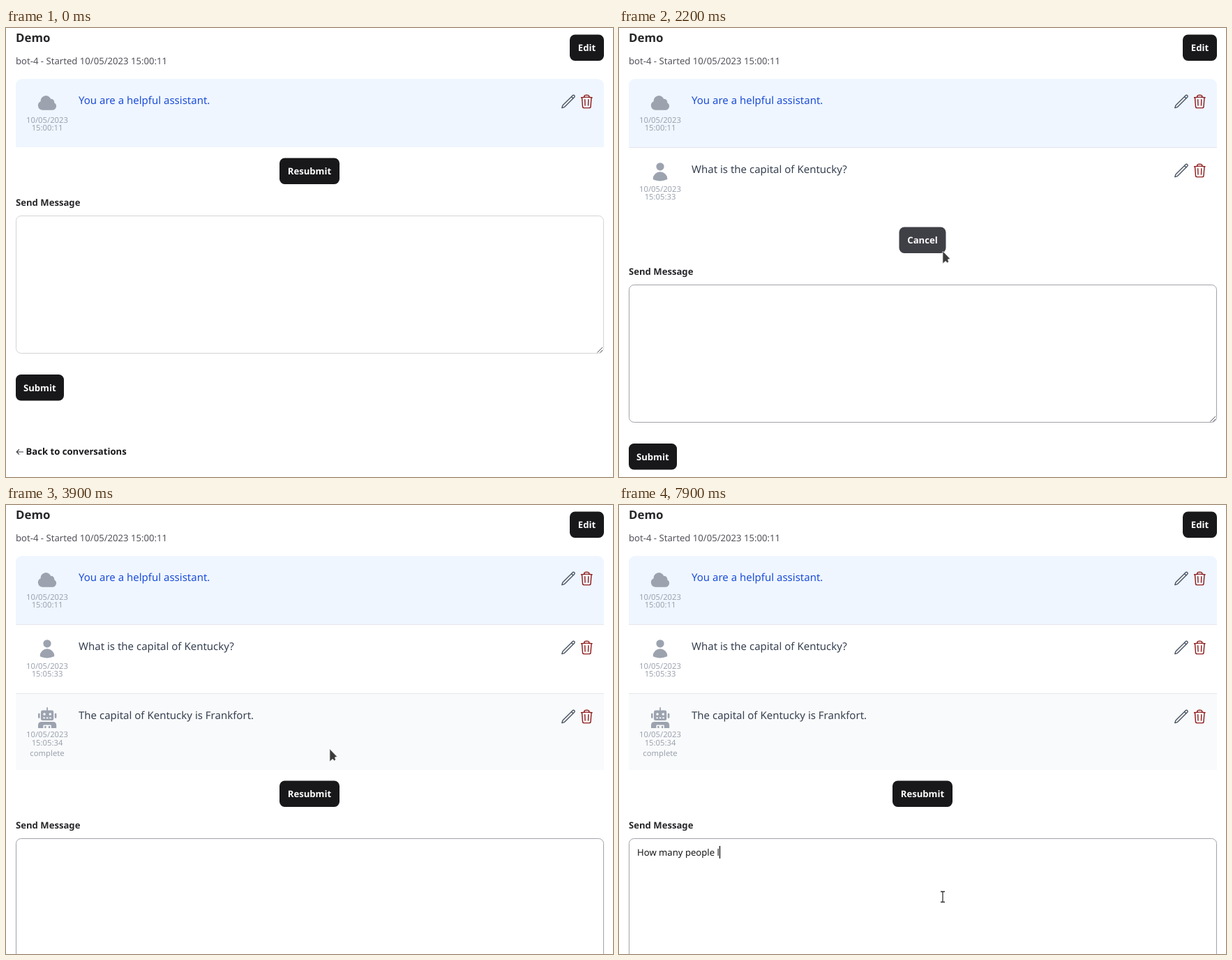
These frames come from a looping animation (870 px wide and 644 px high, 8 s). An HTML page:

```html
<!DOCTYPE html>
<html lang="en">
<head>
<meta charset="utf-8">
<title>Chat demo</title>
<style>
  html, body { margin: 0; width: 100%; height: 100%; overflow: hidden; background: #fff; }
  svg { display: block; width: 870px; height: 644px; }
  text {
    font: 13.125px "Noto Sans", "Open Sans", sans-serif;
    text-rendering: geometricPrecision;
    white-space: pre;
    fill: #18181b;
  }
  .bold { font-weight: 700; }
  .title { font-size: 16.875px; fill: #27272a; }
  .label { fill: #27272a; }
  .meta { fill: #52525b; }
  .msg { font-size: 15px; fill: #374151; }
  .system { fill: #1d4ed8; }
  .date { font-size: 11.25px; fill: #9ca3af; text-anchor: middle; }
  .btn rect { fill: #18181b; }
  .btn.hover rect { fill: #3f3f46; }
  .btn text { fill: #fff; text-anchor: middle; font-weight: 700; }
  .icon { fill: #9ca3af; }
  .line { fill: none; stroke-width: 1.5; stroke-linecap: round; stroke-linejoin: round; }
  .rule { fill: #e5e7eb; }
</style>
</head>
<body>
<svg viewBox="0 0 870 644">
  <defs>
    <g id="tools">
      <path class="line" stroke="#4b5563" transform="translate(794.7 94.2) scale(.9375)"
        d="M16.862 4.487l1.687-1.688a1.875 1.875 0 1 1 2.652 2.652L6.832 19.82a4.5 4.5 0 0 1-1.897 1.13l-2.685.8.8-2.685a4.5 4.5 0 0 1 1.13-1.897L16.863 4.487zm0 0L19.5 7.125"/>
      <path class="line" stroke="#8f1d1d" transform="translate(821 94.2) scale(.9375)"
        d="M14.74 9l-.346 9m-4.788 0L9.26 9m9.968-3.21c.342.052.682.107 1.022.166m-1.022-.165L18.16 19.673a2.25 2.25 0 0 1-2.244 2.077H8.084a2.25 2.25 0 0 1-2.244-2.077L4.772 5.79m14.456 0a48.1 48.1 0 0 0-3.478-.397m-12 .562c.34-.059.68-.114 1.022-.165m0 0a48.1 48.1 0 0 1 3.478-.397m7.5 0v-.916c0-1.18-.91-2.164-2.09-2.201a52 52 0 0 0-3.32 0c-1.18.037-2.09 1.022-2.09 2.201v.916m7.5 0a48.7 48.7 0 0 0-7.5 0"/>
    </g>
  </defs>

  <text class="bold title" x="14" y="19.5">Demo</text>
  <text class="meta" x="14" y="51.5">bot-4 - Started 10/05/2023 15:00:11</text>
  <g class="btn"><rect x="808" y="9.5" width="49" height="37.5" rx="7.5"/><text x="832.5" y="33">Edit</text></g>

  <path fill="#eff6ff" d="M14 171V82a9 9 0 0 1 9-9H848a9 9 0 0 1 9 9V171z"/>
  <path class="icon" transform="translate(44 92.4) scale(1.25)"
    d="M4.5 9.75a6 6 0 0 1 11.573-2.226 3.75 3.75 0 0 1 4.133 4.34A4.5 4.5 0 0 1 18 20.25H6.75a5.25 5.25 0 0 1-2.23-10.004 6.07 6.07 0 0 1-.02-.496z"/>
  <text class="date" x="59" y="135.5">10/05/2023</text>
  <text class="date" x="59" y="146.8">15:00:11</text>
  <text class="msg system" x="104" y="109">You are a helpful assistant.</text>
  <use href="#tools"/>

  <g id="ask">
    <rect class="rule" x="14" y="171" width="843" height="1"/>
    <g class="icon" transform="translate(44 191.3) scale(1.25)">
      <circle cx="12" cy="6" r="4.5"/>
      <path d="M3.751 20.105a8.25 8.25 0 0 1 16.498 0 .75.75 0 0 1-.437.695A18.7 18.7 0 0 1 12 22.5c-2.786 0-5.433-.608-7.812-1.7a.75.75 0 0 1-.437-.695z"/>
    </g>
    <text class="date" x="59" y="234.5">10/05/2023</text>
    <text class="date" x="59" y="245.8">15:05:33</text>
    <text class="msg" x="104" y="208">What is the capital of Kentucky?</text>
    <use href="#tools" y="99"/>
  </g>

  <g id="answer">
    <rect id="panel" x="14" y="271" width="843" height="76" fill="#f9fafb"/>
    <rect class="rule" x="14" y="270" width="843" height="1"/>
    <g class="icon">
      <path d="M58.2 290.3h1.8v5h-1.8z"/>
      <rect x="50" y="294.5" width="18.2" height="14.6" rx="2.4"/>
      <rect x="46" y="298.8" width="2.6" height="7" rx="1"/>
      <rect x="69.8" y="298.8" width="2.6" height="7" rx="1"/>
      <path d="M46 320v-4.2q0-4.8 4.8-4.8h16.6q4.8 0 4.8 4.8v4.2z"/>
      <g fill="#f9fafb">
        <circle cx="55" cy="300" r="1.8"/><circle cx="63.3" cy="300" r="1.8"/>
        <path d="M53.3 304.6h2.6v1.6h-2.6zM57.8 304.6h2.6v1.6h-2.6zM62.3 304.6h2.6v1.6h-2.6z"/>
        <path d="M53.4 320v-3.6q0-1 1-1h9.4q1 0 1 1v3.6z"/>
      </g>
      <path d="M55.3 317h2.2v3h-2.2zM61 317h2.2v3h-2.2z"/>
    </g>
    <text class="msg" id="reply" x="104" y="307"></text>
    <g class="btn" id="stop"><rect x="775" y="290" width="67" height="37.5" rx="7.5"/><text x="808.3" y="313.5">Cancel</text></g>
    <g id="done">
      <text class="date" x="59" y="333.3">10/05/2023</text>
      <text class="date" x="59" y="344.6">15:05:34</text>
      <text class="date" x="59" y="359.5">complete</text>
      <use href="#tools" y="198"/>
    </g>
  </g>

  <g id="form">
    <g class="btn" id="main"><rect y="186.5" height="37.5" rx="7.5"/><text x="435" y="210"></text></g>
    <text class="bold label" x="14" y="255">Send Message</text>
    <rect id="area" x="14.5" y="269.5" width="842" height="197" rx="7" fill="#fff"/>
    <path d="M847.5 465.5l7.5-7.5M851.5 465.5l3.5-3.5" stroke="#55555c" fill="none"/>
    <text id="input" x="26" y="293.5"></text>
    <rect id="caret" y="280" width="1.2" height="18"/>
    <g class="btn"><rect x="14" y="497" width="69" height="37.5" rx="7.5"/><text x="48.3" y="520.8">Submit</text></g>
    <path class="line" style="stroke-width:1.2" stroke="#3f3f46" d="M24.5 608H15.2M18.6 604.6l-3.4 3.4 3.4 3.4"/>
    <text class="bold" x="28.5" y="612">Back to conversations</text>
  </g>

  <g id="cursor">
    <path id="arrow" d="M0 0V17.8L4.2 14.3 6.6 17 8.4 15 7.2 12 10.5 11z" fill="#3b3b3b" stroke="#ddd" stroke-width=".7"/>
    <g id="beam" fill="none">
      <path d="M-3-7.5H3M-3 7.5H3M0-7.5V7.5" stroke="#fff" stroke-width="3"/>
      <path d="M-3-7.5H3M-3 7.5H3M0-7.5V7.5" stroke="#333" stroke-width="1.3"/>
    </g>
  </g>
</svg>

<script>
const LOOP = 8000;
const $ = id => document.getElementById(id);
const show = (id, on) => { $(id).style.display = on ? "" : "none"; };

const ANSWER = "The capital of Kentucky is Frankfort.".split(" ");
const NEXT = "How many people l";

// [time, characters of NEXT]
const typing = [[5300, 2], [5400, 4], [5700, 5], [5800, 6], [6000, 7], [6100, 9],
  [6300, 10], [6400, 11], [6500, 12], [6600, 13], [6900, 14], [7500, 16], [7900, 17]];
// [time, visible]
const blink = [[0, 0], [800, 1], [2200, 0], [2800, 1], [3400, 0], [4500, 1], [5200, 0], [5300, 1]];
// [time, height added above the form]
const shifts = [[0, 0], [2200, 99], [2800, 175], [3400, 209]];
const borders = [[0, "#d4d4d8"], [800, "#bbbbc1"], [900, "#a1a1aa"]];
// [time, x, y]
const mouse = [[300, 464, 157], [400, 464, 203], [500, 464, 277], [600, 464, 320],
  [3900, 464, 350], [4000, 467, 398], [4100, 472, 446], [4200, 478, 508],
  [4300, 482, 556], [4400, 473, 574], [4500, 464, 562]];

const at = (table, t) => table.filter(row => row[0] <= t).pop();

function inputText(t) {
  if (t >= 1500 && t < 2200) return "What is the capital of Kentucky?";
  const step = at(typing, t);
  return step ? NEXT.slice(0, step[1]) : "";
}

function setMain(busy, hover) {
  const [rect, label] = $("main").children;
  const width = busy ? 67 : 86;
  rect.setAttribute("x", 435 - width / 2);
  rect.setAttribute("width", width);
  label.textContent = busy ? "Cancel" : "Resubmit";
  $("main").classList.toggle("hover", hover);
}

function render(t) {
  const shift = at(shifts, t)[1];
  const complete = t >= 3400;

  show("ask", t >= 2200);
  show("answer", t >= 2800);
  show("stop", !complete);
  show("done", complete);
  $("panel").setAttribute("height", complete ? 109 : 76);
  const words = Math.floor((t - 2800) / 100) + 1;
  $("reply").textContent = ANSWER.slice(0, Math.max(0, words)).join(" ");

  $("form").setAttribute("transform", `translate(0 ${shift})`);
  $("area").setAttribute("stroke", at(borders, t)[1]);
  const input = $("input");
  input.textContent = inputText(t);
  $("caret").setAttribute("x", 26 + (input.textContent ? input.getComputedTextLength() : 0));
  show("caret", at(blink, t)[1]);

  const pos = at(mouse, t);
  show("cursor", pos);
  let hover = false;
  if (pos) {
    const [, x, y] = pos;
    const local = y - shift;
    const inArea = local > 269 && local < 467;
    hover = local > 186 && local < 224;
    $("cursor").setAttribute("transform", `translate(${x} ${y})`);
    show("arrow", !inArea);
    show("beam", inArea);
  }
  setMain(t >= 2200 && !complete, hover);
}

const start = performance.now();
function tick() {
  render((performance.now() - start) % LOOP);
  requestAnimationFrame(tick);
}
tick();
</script>
</body>
</html>
```
